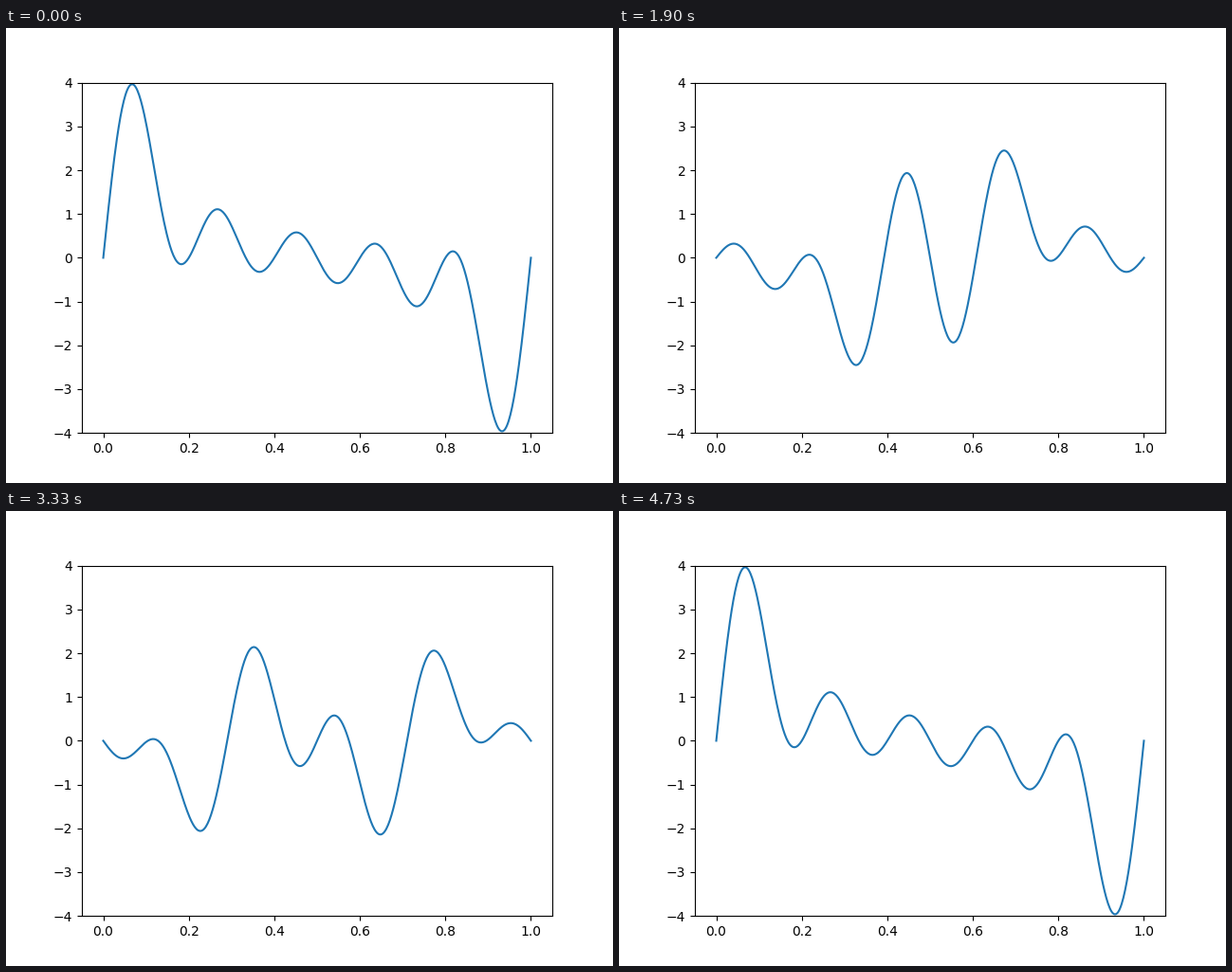
These frames come from a looping animation (640 px wide and 480 px high, 4.83 s). A matplotlib script:

```python
import numpy as np
import matplotlib.pyplot as plt
from matplotlib.animation import FuncAnimation

LOOP = 4830      # ms
TICK = 30        # ms per drawn frame
STEP = 100       # ms per pose
STEPS = 49       # poses in one wave period
HALF, RESUME = 2400, 2430  # the middle pose is held only briefly

x = np.linspace(0, 1, 501)
modes = np.arange(1, 6)[:, None]
shapes = np.sin(2 * np.pi * modes * x)


def wave(t):
    """Standing wave: five equal harmonics, t in periods."""
    return (shapes * np.cos(2 * np.pi * modes * t)).sum(axis=0)


def pose(ms):
    if ms < RESUME:
        return min(ms, HALF) // STEP
    return 26 + (ms - RESUME) // STEP


fig, ax = plt.subplots(figsize=(6.4, 4.8), dpi=100)
line, = ax.plot(x, wave(0), color="#1f77b4", lw=1.5)
ax.set_ylim(-4, 4)


def update(frame):
    ms = frame * TICK + TICK - 1
    line.set_ydata(wave(pose(ms) / STEPS))
    return line,


anim = FuncAnimation(fig, update, frames=LOOP // TICK, interval=TICK,
                     repeat=True, repeat_delay=0)
plt.show()
```
